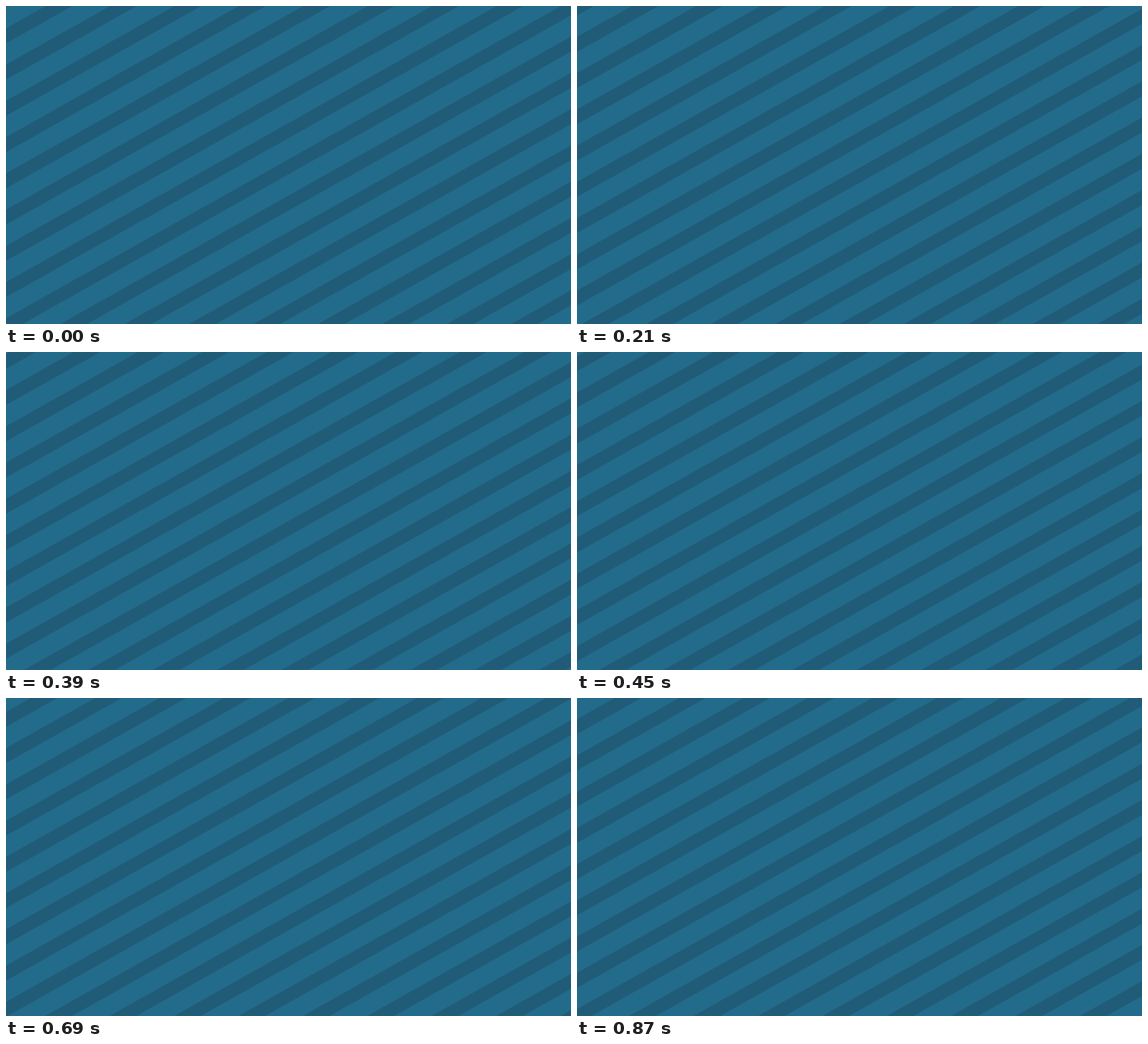
Recreate the animation shown at these times as an HTML page without scripts. Size 998 px wide and 561 px high, loop 900 ms.

```html
<!DOCTYPE html>
<html lang="en">
<head>
<meta charset="utf-8">
<title>Diagonal stripes</title>
<style>
  html, body {
    margin: 0;
    width: 100%;
    height: 100%;
    overflow: hidden;
    background: #236b8b;
  }
  svg {
    display: block;
    width: 998px;
    height: 561px;
  }
  .stripes {
    stroke: #205c78;
    stroke-width: 561;
    stroke-dasharray: 47.5 66.25;
  }
  .slide {
    animation: slide 900ms steps(30) infinite;
  }
  @keyframes slide {
    to { transform: translateX(113.75px); }
  }
</style>
</head>
<body>
<svg viewBox="0 0 998 561">
  <g class="slide">
    <!-- One dashed line as tall as the stage, skewed along the stage diagonal -->
    <path class="stripes" d="M-271.25 280.5H2200" transform="matrix(1 0 -1.77897 1 0 0)"/>
  </g>
</svg>
</body>
</html>
```
